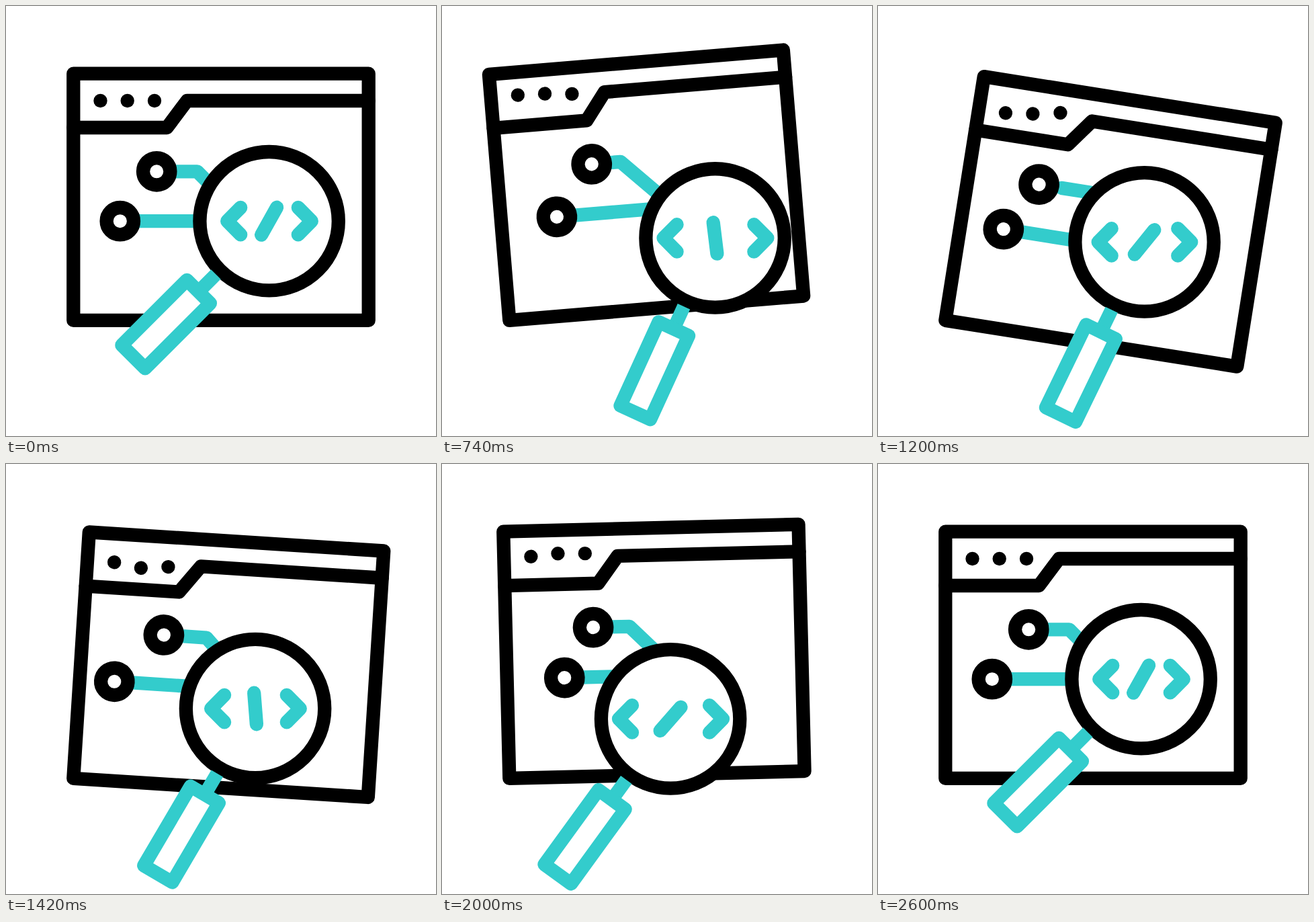
These frames come from a looping animation (640 by 640 pixels, 3000 ms). An HTML page:

```html
<!DOCTYPE html>
<html lang="en">
<head>
<meta charset="utf-8">
<title>Code search</title>
<style>
  html, body { margin: 0; width: 100%; height: 100%; overflow: hidden; background: #fff; }
  svg { display: block; width: 100vw; height: 100vh; }
  svg * { stroke-linecap: round; stroke-linejoin: round; }
  .ink { fill: none; stroke: #000; stroke-width: 20.3; }
  .teal { fill: none; stroke: #33cccc; stroke-width: 20.3; }
  .paper { fill: #fff; }
  .butt { stroke-linecap: butt; }
</style>
</head>
<body>
<svg viewBox="0 0 640 640">
  <g id="win">
    <rect class="ink paper" x="100.3" y="100.6" width="439.4" height="367.3"/>
    <path class="ink" d="M100.3 181H239.5L269.5 141H539.7"/>
    <circle id="dot1" cx="140.5" cy="141" r="10.2"/>
    <circle id="dot2" cx="180.7" cy="141" r="10.2"/>
    <circle id="dot3" cx="221" cy="141" r="10.2"/>
    <path class="teal" d="M240 246.3H284.5L350 311.8"/>
    <path class="teal" d="M182 320.2H340"/>
    <circle id="node1" class="ink paper" cx="224.2" cy="246.3" r="20.2"/>
    <circle id="node2" class="ink paper" cx="169.8" cy="320.2" r="20.2"/>
  </g>
  <g id="lens">
    <circle class="ink paper" r="103.2"/>
    <g id="handle">
      <path class="teal butt" d="M0 112V149"/>
      <rect class="teal paper" x="-24.5" y="148.5" width="49" height="137"/>
    </g>
    <path id="open" class="teal" d="M-42.4 -20.2L-62.4 0L-42.4 20.2"/>
    <path id="slash" class="teal" d="M0 -23.4V23.4"/>
    <path id="close" class="teal" d="M43.2 -20.2L63.2 0L43.2 20.2"/>
  </g>
</svg>
<script>
const LOOP = 3000, STEP = 20;
const el = id => document.getElementById(id);

// Value at time t on a track of [time, value] keys, eased in and out.
function at(track, t) {
  if (t <= track[0][0]) return track[0][1];
  for (let i = 1; i < track.length; i++) {
    const [t0, a] = track[i - 1], [t1, b] = track[i];
    if (t < t1) {
      const u = (t - t0) / (t1 - t0);
      return a + (b - a) * u * u * (3 - 2 * u);
    }
  }
  return track[track.length - 1][1];
}

// Evenly spaced keys starting at 200 ms.
const every = (gap, ...values) => values.map((v, i) => [200 + i * gap, v]);

const tilt = every(500, 0, -5, 9, -4, 0);
const slide = every(500, 0, 18, -18, 18, 0);
const bounce = every(500, 0, -6.5, 8, -6.5, 0);
const spread = every(600, 0, 15, 3.5, 14.7, 0);

// Lens stops: rest, right, left, rest.
const stops = (a, b) => [[200, 0], [800, a], [1000, a], [1800, b], [2000, b], [2600, 0]];
const lensX = stops(15.4, -51.5);
const lensY = stops(26, 59.2);
const swing = stops(-21, -9);

const lean = [[200, 0], [550, -38.5], [700, -38.5], [1020, 12], [1160, 12],
  [1480, -38.5], [1640, -38.5], [1960, 12], [2100, 12], [2460, 0]];

const move = (id, x, y) => el(id).setAttribute("transform", `translate(${x} ${y})`);
const turn = (id, deg, pivot = "0 0") => el(id).setAttribute("transform", `rotate(${deg} ${pivot})`);

function draw(t) {
  turn("win", at(tilt, t), "100.3 467.9");
  for (let i = 0; i < 3; i++) move("dot" + (i + 1), 0, at(bounce, t - i * 200));
  for (let i = 0; i < 2; i++) move("node" + (i + 1), at(slide, t - i * 200), 0);

  move("lens", 391.6 + at(lensX, t), 320.2 + at(lensY, t));
  turn("handle", 45 + at(swing, t));
  const gap = at(spread, t);
  move("open", -gap, 0);
  move("close", gap, 0);
  turn("slash", 29.3 + at(lean, t));
}

const start = performance.now();
function tick() {
  const t = (performance.now() - start) % LOOP;
  draw(Math.floor(t / STEP) * STEP);
  requestAnimationFrame(tick);
}
tick();
</script>
</body>
</html>
```
